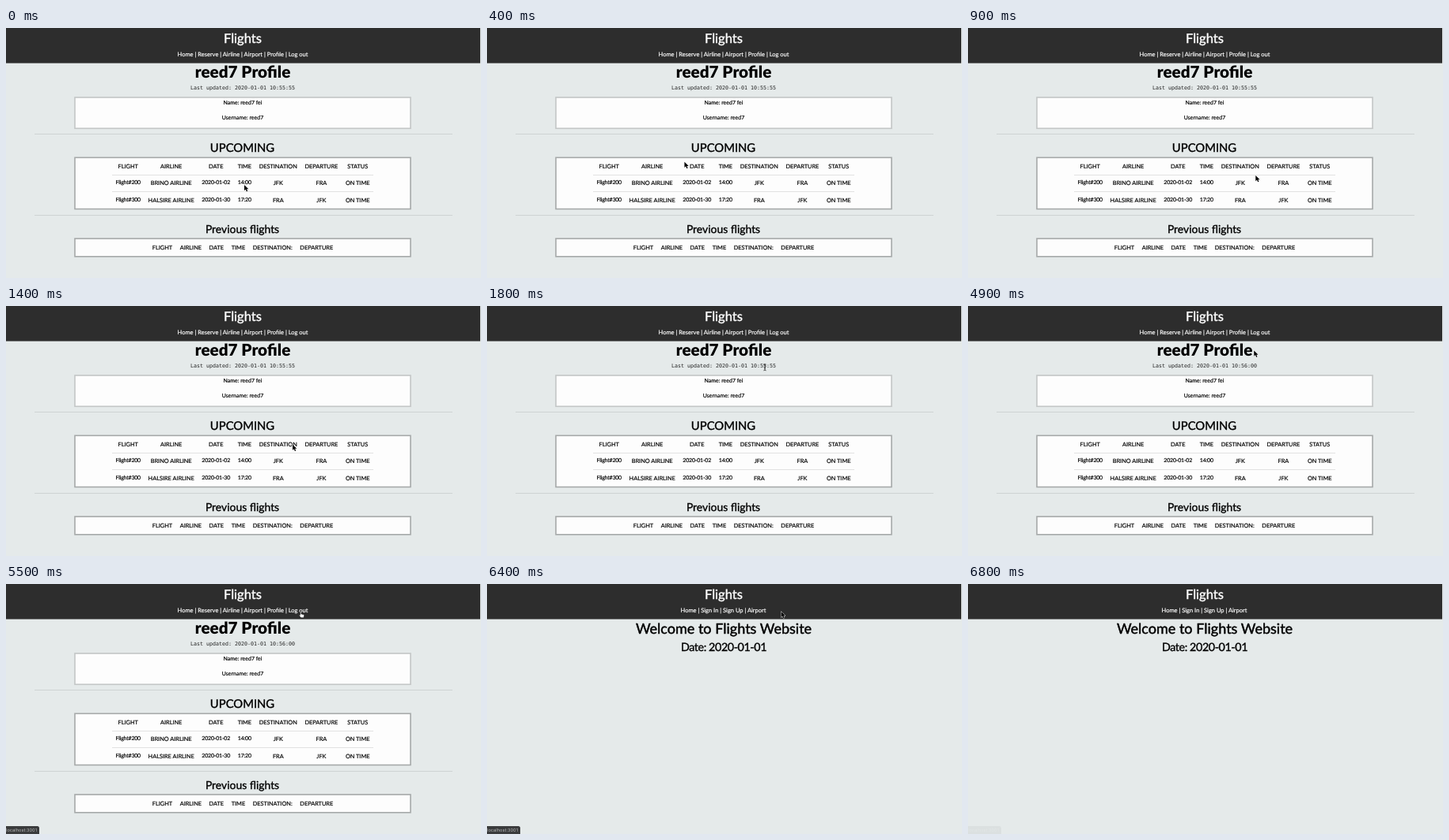
Write an HTML page that moves like this. It is 600 px wide and 317 px high and loops after 7200 ms.

```html
<!DOCTYPE html>
<html lang="en">
<head>
<meta charset="utf-8">
<title>Flights</title>
<style>
  html, body { margin: 0; width: 100%; height: 100%; overflow: hidden; background: #e5eaea; }
  svg { display: block; width: 100vw; height: 100vh; color: #000; }
  text, .grid { font: 7.35px Lato, "Open Sans", sans-serif; text-rendering: geometricPrecision; }
  text { text-anchor: middle; fill: currentColor; stroke: currentColor; stroke-width: .025em; }
  .brand { font-size: 16.6px; color: #fff; }
  .nav { font-size: 7.5px; color: #fff; }
  .name { font-size: 20.7px; font-weight: 900; stroke: none; }
  .clock { font: 6.65px "DejaVu Sans Mono", monospace; color: #222; stroke: none; }
  .info { font-size: 7px; }
  .h2 { font-size: 14.8px; }
  .h3 { font-size: 13.9px; }
  .welcome { font-size: 18.05px; }
  .date { font-size: 14.3px; letter-spacing: -.4px; }
  .card { fill: #fdfdfd; stroke: #a6a9a9; stroke-width: 1.6; }
  .soft { stroke: #c3c6c6; }
  .hr { stroke: #ced3d3; }
  .row { stroke: #dcdcdc; stroke-width: .8; }
  .tip { font: 5.7px Inter, sans-serif; text-anchor: start; color: #b4b6b6; stroke: none; }
  .grid { display: grid; justify-content: center; column-gap: 9.6px; grid-auto-rows: 21.4px;
    line-height: 21.4px; text-align: center; white-space: nowrap; -webkit-text-stroke: .18px; }
  .digits { font-size: 7px; letter-spacing: -.2px; }
</style>
</head>
<body>
<svg viewBox="0 0 600 317" preserveAspectRatio="none">
  <rect width="600" height="317" fill="#e5eaea"/>
  <rect width="599" height="44.6" fill="#2d2d2d"/>
  <text class="brand" x="299" y="19.2">Flights</text>

  <g id="profile">
    <text class="nav" x="299" y="36.3">Home | Reserve | Airline | Airport | Profile | Log out</text>
    <text class="name" x="299" y="63">reed7 Profile</text>
    <text class="clock" x="299" y="78">Last updated: 2020-01-01 <tspan id="clock">10:55:55</tspan></text>
    <rect class="card soft" x="87" y="88" width="424" height="39.3"/>
    <text class="info" x="299" y="97">Name: reed7 fei</text>
    <text class="info" x="299" y="116">Username: reed7</text>
    <path class="hr" d="M36 134.5H564M36 237.5H564"/>
    <text class="h2" x="298.5" y="157">UPCOMING</text>
    <rect class="card" x="87" y="164.3" width="424" height="65.2"/>
    <path class="row" d="M134 186.5H464M134 207.5H464"/>
    <foreignObject x="87" y="164.9" width="424" height="65"><div class="grid" id="upcoming"></div></foreignObject>
    <text class="h3" x="298.5" y="259.5">Previous flights</text>
    <rect class="card" x="87" y="267" width="424" height="22.8"/>
    <foreignObject x="87" y="267.9" width="424" height="22"><div class="grid" id="previous"></div></foreignObject>
  </g>

  <g id="guest">
    <text class="nav" x="298.5" y="36.3">Home | Sign In | Sign Up | Airport</text>
    <text class="welcome" x="299" y="62.7">Welcome to Flights Website</text>
    <text class="date" x="299" y="85.2">Date: 2020-01-01</text>
  </g>

  <g id="status">
    <path d="M0 307H39.5Q42 307 42 309.5V317H0Z" fill="#3a3b3c"/>
    <text class="tip" x="0" y="314">localhost:3001</text>
  </g>

  <g id="cursor">
    <path id="arrow" d="M0 0V7.2L1.7 5.6 2.9 8.4 4.2 7.8 3 5.2H5.3Z" fill="#000" stroke="#fff" stroke-width=".9" paint-order="stroke"/>
    <path id="beam" d="M-1.6-3.8Q0-3.8 0-2.8Q0-3.8 1.6-3.8M0-2.8V2.8M-1.6 3.8Q0 3.8 0 2.8Q0 3.8 1.6 3.8M-.9 1H.9" fill="none" stroke="#222" stroke-width=".8"/>
    <path id="hand" d="M0 .6Q.7-.4 1.4.6V3L4.6 3.7Q5.4 4 5.2 5L4.6 7.8H1.1L-1.4 4.8Q-1.2 3.8 0 4.6Z" fill="#fff" stroke="#000" stroke-width=".5"/>
  </g>
</svg>
<script>
  const $ = id => document.getElementById(id);

  function fillGrid(id, ...rows) {
    const cells = rows.map(row => row.split(", "));
    $(id).style.gridTemplateColumns = `repeat(${cells[0].length}, auto)`;
    for (const label of cells.flat()) {
      const cell = document.createElement("span");
      cell.textContent = label;
      if (/\d/.test(label)) cell.className = "digits";
      $(id).append(cell);
    }
  }

  fillGrid("upcoming",
    "FLIGHT, AIRLINE, DATE, TIME, DESTINATION, DEPARTURE, STATUS",
    "Flight#200, BRINO AIRLINE, 2020-01-02, 14:00, JFK, FRA, ON TIME",
    "Flight#300, HALSIRE AIRLINE, 2020-01-30, 17:20, FRA, JFK, ON TIME");
  fillGrid("previous", "FLIGHT, AIRLINE, DATE, TIME, DESTINATION:, DEPARTURE");

  const ramp = (t, from, to) => Math.min(1, Math.max(0, (t - from) / (to - from)));
  const smooth = k => k * k * (3 - 2 * k);
  const show = (id, on) => $(id).style.display = on ? "" : "none";

  // One sweep around the table, then glides to the clock, the log-out link and off the top
  function pointer(t) {
    const angle = 5.05 * ramp(t, 0, 900);
    let x = 301 - 66 * Math.sin(angle);
    let y = 181 + 18 * Math.cos(angle);
    const glide = (k, toX, toY) => {
      x += (toX - x) * k;
      y += (toY - y) * k;
    };
    glide(smooth(ramp(t, 1300, 1800)), 351, 78);
    glide(smooth(ramp(t, 4600, 5200)), 371.5, 35);
    glide(ramp(t, 6500, 6800), 378, -3);
    return [x, y];
  }

  function draw(now) {
    // The screen refreshes ten times a second
    const t = Math.floor(now % 7200 / 100) * 100;
    const [x, y] = pointer(t);
    const loggedIn = t < 6400;
    const beam = t >= 1800 && t < 4800;
    const hand = t >= 5000 && loggedIn;

    show("profile", loggedIn);
    show("guest", !loggedIn);
    $("clock").textContent = t < 3800 ? "10:55:55" : "10:56:00";
    $("cursor").setAttribute("transform", `translate(${x} ${y})`);
    show("cursor", t < 6800);
    show("beam", beam);
    show("hand", hand);
    show("arrow", !beam && !hand);
    $("status").setAttribute("opacity", ramp(t, 5300, 5500) - .95 * ramp(t, 6500, 6800));
  }

  const start = performance.now();
  function tick() {
    draw(performance.now() - start);
    requestAnimationFrame(tick);
  }
  tick();
</script>
</body>
</html>
```
